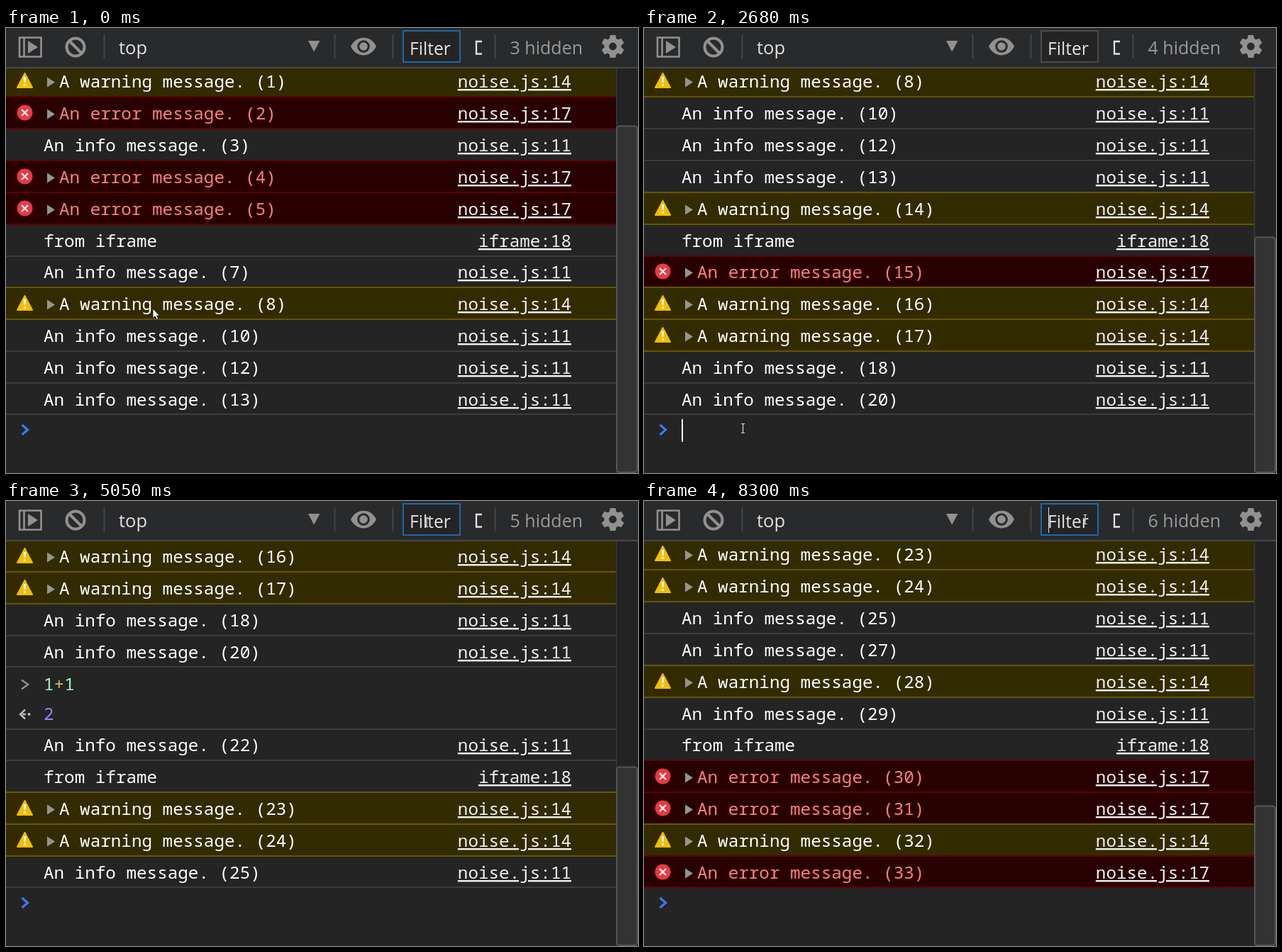
Write an HTML page that moves like this. It is 891 by 628 pixels and loops after 8.36 s.

```html
<!DOCTYPE html>
<html lang="en">
<head>
<meta charset="utf-8">
<title>Console</title>
<style>
  html, body { margin: 0; width: 100%; height: 100%; overflow: hidden; background: #242424; }
  svg { display: block; width: 891px; height: 628px; }
  text { white-space: pre; }
  .mono { font: 500 24.28px "Noto Sans Mono", "DejaVu Sans Mono", monospace; fill: #fff; }
  .ui { font: 25px "Open Sans", "Noto Sans", sans-serif; fill: #e2e2e2; }
  .link { text-decoration: underline; text-anchor: end; fill: #f0f0f0; }
  .line { fill: none; stroke-linecap: butt; }
</style>
</head>
<body>
<svg viewBox="0 0 891 628" xmlns="http://www.w3.org/2000/svg">
  <defs>
    <clipPath id="view"><rect y="57" width="891" height="571"/></clipPath>
    <g id="warn">
      <path d="M0-10.5 10.5 9.5H-10.5Z" fill="#f5bd00" stroke="#f5bd00" stroke-width="2" stroke-linejoin="round"/>
      <path d="M-1.7-5.5H1.7L1.1 2.5H-1.1ZM-1.5 4.5H1.5V7.5H-1.5Z" fill="#fff"/>
    </g>
    <g id="error">
      <circle r="11" fill="#eb3941"/>
      <path d="M-4.5-4.5 4.5 4.5M4.5-4.5-4.5 4.5" stroke="#fff" stroke-width="2.2"/>
    </g>
    <path id="arrow" d="M0 0V13.5L3.2 10.8 5.3 15.5 7.6 14.5 5.5 10H9.5Z" fill="#fff" stroke="#111" stroke-width=".9"/>
    <path id="beam" class="line" d="M-2.5-6.5H-.8L0-5.5.8-6.5H2.5M0-5.5V5.5M-2.5 6.5H-.8L0 5.5.8 6.5H2.5" stroke="#ddd" stroke-width="1.2"/>
  </defs>
  <rect width="891" height="628" fill="#242424"/>
  <g clip-path="url(#view)">
    <g id="list"></g>
    <g id="prompt">
      <path class="line" d="M22.5-7 30.5 0 22.5 7" stroke="#367cf1" stroke-width="3.2"/>
      <text id="input" class="mono" x="53" y="8"></text>
      <g id="preview" transform="translate(0 42)" opacity=".65"></g>
      <rect id="caret" y="-15" width="2" height="32" fill="#fff"/>
    </g>
    <rect x="860" y="57" width="31" height="571" fill="#232323"/>
    <rect x="860" y="57" width="1.5" height="571" fill="#383838"/>
    <rect id="thumb" x="861" width="29" rx="4" fill="#333" stroke="#555" stroke-width="2"/>
  </g>
  <rect width="891" height="56" fill="#292a2c"/>
  <rect y="55" width="891" height="2" fill="#484848"/>
  <path d="M138.5 9V43M463.5 9V43M545.5 9V43M689.5 9V43" stroke="#464646" stroke-width="2"/>
  <g fill="#919191">
    <path class="line" d="M19 13.5H49.5V40.5H19ZM25.5 13V41" stroke="#919191" stroke-width="2.6"/>
    <path d="M31 18 45 27 31 36Z"/>
    <g class="line" stroke="#919191" stroke-width="4"><circle cx="98" cy="27" r="12.5"/><path d="M89 18 107 36"/></g>
    <path d="M426 18H442.5L434.2 33.5Z"/>
    <path d="M486 26C494 9.5 514 9.5 522 26 514 42.5 494 42.5 486 26Z"/>
    <circle cx="504" cy="26" r="7.3" fill="none" stroke="#292a2c" stroke-width="3"/>
    <g id="gear"></g>
  </g>
  <text class="ui" x="159" y="37" style="font-size:25.5px">top</text>
  <rect id="filterBox" x="560" y="4" width="80" height="44" fill="#242424" stroke-width="2"/>
  <text id="filter" class="ui" x="569" y="38" style="font-size:24.7px"></text>
  <rect id="filterCaret" y="9" width="1" height="36" fill="#ddd"/>
  <path class="line" d="M671 19H663V36.5H671" stroke="#e2e2e2" stroke-width="2.3"/>
  <text id="hidden" class="ui" x="813" y="37" text-anchor="end" style="fill:#9a9a9a"></text>
  <use id="pointer"/>
</svg>
<script>
const LOOP = 8360, VIEW_TOP = 57, VIEW = 571, LINE = 44.9;
const $ = id => document.getElementById(id);

// W warning, E error, I info, F iframe, C command, R result
const log = [
  [0, "W1 E2 I3 E4 E5 F I7 W8 I10 I12 I13"], [370, "W14"], [640, "F"], [800, "E15"],
  [1210, "W16"], [1660, "W17"], [2220, "I18"], [2680, "I20"], [2760, "C R"],
  [3560, "I22"], [3790, "F"], [3910, "W23"], [4190, "W24"], [4770, "I25"],
  [5680, "I27"], [6250, "W28"], [6570, "I29"], [6900, "F"], [7030, "E30"],
  [7350, "E31"], [7870, "W32"], [8220, "E33"]
].flatMap(([time, rows]) => rows.split(" ").map(row => ({ time, kind: row[0], n: row.slice(1) })));
const muted = [2680, 3160, 5280];

const kinds = {
  W: { text: "A warning message.", src: "noise.js:14", icon: "warn", bg: "#332b00", edge: "#665500", ink: "#fff" },
  E: { text: "An error message.", src: "noise.js:17", icon: "error", bg: "#290000", edge: "#5c0000", ink: "#ff8080" },
  I: { text: "An info message.", src: "noise.js:11" },
  F: { text: "from iframe", src: "iframe:18" }
};
const sum = '<tspan fill="#a1f7b5">1</tspan><tspan fill="#d2c057">+</tspan><tspan fill="#a1f7b5">1</tspan>';
const result = '<path class="line" d="M27-6.5 20 0 27 6.5M23 0H28" stroke="#bdbdbd" stroke-width="2.4"/>' +
  '<circle cx="32.5" r="2" fill="#bdbdbd"/><text class="mono" x="53" y="8" style="fill:#9980ff">2</text>';

const heightOf = row => row.kind === "R" ? 42 : LINE;
const isCommand = row => "CR".includes(row.kind);
const during = (t, ...spans) => spans.some(([from, to]) => t >= from && t < to);
const count = (list, t) => list.filter(time => time <= t).length;
const bar = (y, color) => `<rect y="${y}" width="860" height="2" fill="${color}"/>`;

function rowBody(row) {
  if (row.kind === "C")
    return `<path class="line" d="M22-6.5 31 0 22 6.5" stroke="#919191" stroke-width="2.4"/><text class="mono" x="53" y="8">${sum}</text>`;
  if (row.kind === "R") return result;
  const k = kinds[row.kind], label = k.text + (row.n && ` (${row.n})`);
  const badge = k.icon
    ? `<use href="#${k.icon}" x="26.5" y="-1.5"/><path d="M58-6.5 69 .5 58 7.5Z" fill="#949494"/>` : "";
  return `${badge}<text class="mono" x="${k.icon ? 75 : 53}" y="8" style="fill:${k.ink || "#fff"}">${label}</text>` +
    `<text class="mono link" x="797" y="8">${k.src}</text>`;
}

function drawList(rows, end) {
  let bottom = end, fills = "", edges = "", bodies = "";
  for (let i = rows.length - 1; i >= 0 && bottom > VIEW_TOP; i--) {
    const row = rows[i], k = kinds[row.kind] || {}, h = heightOf(row);
    const next = rows[i + 1] && kinds[rows[i + 1].kind];
    const y = Math.round(bottom);
    if (k.bg) fills += `<rect y="${y - 45}" width="860" height="45" fill="${k.bg}"/>`;
    if (row.kind !== "C")
      edges += bar(y - (next ? 1 : 2), (next && next.edge) || k.edge || "#3c3c3c");
    bodies += `<g transform="translate(0 ${y - 21})">${rowBody(row)}</g>`;
    bottom -= h;
  }
  $("list").innerHTML = fills + edges + bodies;
}

// Pointer stops: time, x, y
const path = [[0, 207, 396], [70, 207, 396], [800, 139.5, 565], [3490, 139.5, 565], [4060, 593, 180],
  [4190, 595, 75], [4500, 593, 30], [6700, 593, 30], [7100, 622, 26], [LOOP, 622, 26]];
function pointerAt(t) {
  const i = path.findIndex(p => p[0] > t), a = path[i - 1], b = path[i];
  const u = (t - a[0]) / (b[0] - a[0]), e = u * u * (3 - 2 * u);
  return [a[1] + (b[1] - a[1]) * e, a[2] + (b[2] - a[2]) * e];
}

const show = (id, on) => $(id).setAttribute("visibility", on ? "visible" : "hidden");
const set = (id, attrs) => { for (const k in attrs) $(id).setAttribute(k, attrs[k]); };

let lastKey = "";
function render(t) {
  const filtered = during(t, [5350, 6640]);
  const logged = log.filter(row => row.time <= t);
  const rows = filtered ? logged.filter(isCommand) : logged;
  const total = rows.reduce((h, row) => h + heightOf(row), 0);
  const end = filtered ? VIEW_TOP + Math.round(total) : 546;
  const key = filtered + ":" + rows.length;
  if (key !== lastKey) { drawList(rows, end); lastKey = key; }
  set("prompt", { transform: `translate(0 ${end + 21})` });

  const thumb = VIEW * VIEW / (total + 172);
  show("thumb", !filtered);
  set("thumb", { y: 628 - thumb, height: thumb - 1 });

  const typed = during(t, [2000, 2680]) ? (t < 2220 ? 1 : t < 2290 ? 2 : 3) : 0;
  const parts = sum.split("</tspan>").slice(0, typed);
  $("input").innerHTML = parts.map(p => p + "</tspan>").join("");
  show("preview", typed === 3);
  set("caret", { x: 53 + typed * 14.57 });
  show("caret", during(t, [800, 1370], [1660, 3240], [3740, 4290]));

  const silent = 3 + count(muted, t);
  const logs = logged.filter(row => !isCommand(row)).length + 2;
  $("hidden").textContent = (filtered ? logs + silent - 3 : silent) + " hidden";

  const query = during(t, [5280, 5350], [6570, 6640]) ? "z" : filtered ? "zz" : "";
  $("filter").textContent = query || "Filter";
  set("filterBox", { stroke: during(t, [800, 4520]) ? "#4b4b4b" : "#1769ae" });
  set("filterCaret", { x: 570 + query.length * 12.5 });
  show("filterCaret", during(t, [4520, 5050], [5280, 5850], [6250, 7640], [8220, LOOP]));

  const [x, y] = pointerAt(t);
  set("pointer", { href: y > 548 || y < 50 ? "#beam" : "#arrow", x, y });
}

function drawGear() {
  let teeth = "";
  for (let a = 0; a < 360; a += 60)
    teeth += `<path d="M-5-10-3.8-16H3.8L5-10Z" transform="rotate(${a})"/>`;
  set("gear", { transform: "translate(855.5 26)" });
  $("gear").innerHTML = teeth + '<circle r="8.7" fill="none" stroke="#919191" stroke-width="6.6"/>';
}

drawGear();
$("preview").innerHTML = result;
const start = performance.now();
function tick() {
  render((performance.now() - start) % LOOP);
  requestAnimationFrame(tick);
}
tick();
</script>
</body>
</html>
```
